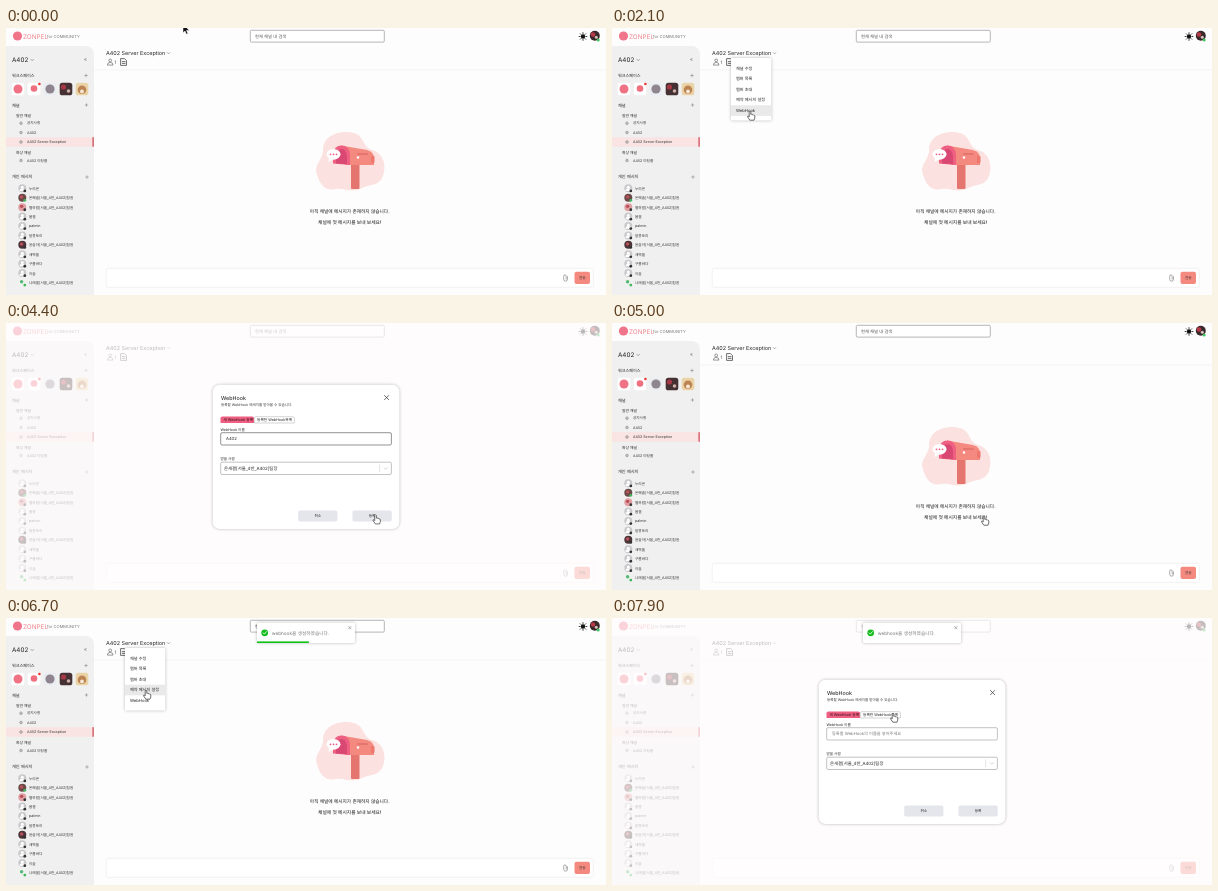
An HTML page that plays this animation: 600 px wide and 267 px high, repeating every 8 s.

```html
<!DOCTYPE html>
<html lang="ko">
<head>
<meta charset="utf-8">
<title>Webhook demo</title>
<style>
  html, body { margin: 0; width: 100%; height: 100%; overflow: hidden; background: #fefdfd; }
  svg { display: block; width: 100%; height: 100%; }
  text { font-family: Inter, "Noto Sans CJK KR", "Noto Sans CJK", sans-serif; text-rendering: geometricPrecision; white-space: pre; }
  .soft { filter: drop-shadow(0 .6px 1.8px rgba(0, 0, 0, .28)); }
</style>
</head>
<body>
<svg id="stage" viewBox="0 0 600 267"></svg>
<script>
const LOOP = 8000;
const INK = '#222', PINK = '#ee5f82', SALMON = '#f4897f';

// Text is placed by its vertical centre.
const text = (x, y, size, str, fill = INK, attrs = '') =>
  `<text x="${x}" y="${y + size * .36}" font-size="${size}" fill="${fill}" ${attrs}>${str}</text>`;
const middle = 'text-anchor="middle" font-weight="500"';
const rect = (x, y, w, h, fill, r = 0, attrs = '') =>
  `<rect x="${x}" y="${y}" width="${w}" height="${h}" rx="${r}" fill="${fill}" ${attrs}/>`;
const circle = (x, y, r, fill, attrs = '') => `<circle cx="${x}" cy="${y}" r="${r}" fill="${fill}" ${attrs}/>`;
const line = (d, stroke = INK, width = .6) =>
  `<path d="${d}" fill="none" stroke="${stroke}" stroke-width="${width}" stroke-linecap="round" stroke-linejoin="round"/>`;
const chevron = (x, y, s = 1.3, color = '#555') => line(`M${x - s} ${y - s / 2}l${s} ${s}l${s} ${-s}`, color, .5);
const cross = (x, y, s, color, w) => line(`M${x - s} ${y - s}l${2 * s} ${2 * s}m0 ${-2 * s}l${-2 * s} ${2 * s}`, color, w);
const plus = (x, y) => line(`M${x - 1.3} ${y}h2.6m-1.3 -1.3v2.6`, '#777', .5);

function darkPicture(x, y, r) {
  return circle(x, y, r, '#38292b') + circle(x - r * .35, y - r * .25, r * .45, '#b83a48') +
    circle(x + r * .3, y + r * .3, r * .3, '#d8c4bd');
}

function topBar() {
  const rays = Array.from({ length: 8 }, (_, i) => {
    const c = Math.cos(i * Math.PI / 4), s = Math.sin(i * Math.PI / 4);
    return `M${577 + 3 * c} ${8.5 + 3 * s}L${577 + 3.9 * c} ${8.5 + 3.9 * s}`;
  }).join('');
  return circle(11.5, 8, 4.6, '#f0748a') +
    text(17, 8.2, 6.4, 'ZONPEL', '#ee8790') +
    text(41, 9, 4.1, 'for COMMUNITY', '#777') +
    rect(244.3, 2.3, 134, 11.8, '#fff', 1.2, 'stroke="#999" stroke-width=".7"') +
    text(249, 8.3, 4.3, '현재 채널 내 검색', '#555') +
    circle(577, 8.5, 2.2, '#111') + line(rays, '#111', .8) +
    darkPicture(588.8, 7.8, 5) + circle(592.2, 12, 1.5, '#3fc564');
}

function workspaceIcons() {
  const tile = (x, fill) => rect(x - 6.3, 54.7, 12.6, 12.6, fill, 2.6);
  return tile(12, '#fff') + circle(12, 61, 4.5, '#ef7285') +
    tile(28, '#fff') + circle(28, 60.5, 3.3, '#ef6f7f') + circle(33.4, 56, 1.3, '#e33') +
    tile(44, '#e9edf2') + circle(44, 61, 4.6, '#8f858f') +
    tile(60, '#453033') + circle(57.5, 59, 2.6, '#a63845') + circle(62.5, 63, 1.8, '#cdb0a8') +
    tile(76, '#ead3a6') + circle(76, 61.8, 4.3, '#bd8453') + circle(76, 63.5, 2, '#f6e8d2');
}

function directMessages() {
  const team = '[서울_4반_A402]팀원';
  const people = ['누리온', '온해솔' + team, '별하람' + team, '봄결', 'palmin', '달콩토리',
    '윤슬아' + team, '새벽돌', '구름바다', '이슬', '나래울' + team];
  const pictures = { 1: '#6a4a48', 2: '#e0a0a4', 6: '#4a3438', 10: '#eef2ee' };
  return people.map((name, i) => {
    const y = 160.3 + 9.42 * i;
    const avatar = pictures[i]
      ? circle(16.3, y, 4, pictures[i]) + circle(15.6, y - .8, 1.7, i === 10 ? '#55b878' : '#b9505a')
      : circle(16.3, y, 4, '#c9c9cc') + circle(16.3, y - 1.1, 1.5, '#fff') +
        `<path d="M13.5 ${y + 2.7}a2.8 2.6 0 0 1 5.6 0z" fill="#fff"/>`;
    return avatar + circle(18.8, y + 2.6, 1.4, i === 1 || i === 10 ? '#3fb85c' : '#333') +
      text(23, y + .2, 3.65, name, '#333');
  }).join('');
}

function sidebar() {
  const channel = (y, name) =>
    circle(15, y, 1.3, 'none', 'stroke="#777" stroke-width=".6"') + circle(15, y, .5, '#777') + text(21, y, 3.6, name, '#333');
  return `<path d="M0 18H79q9 0 9 9V267H0z" fill="#f0f0f0"/>` +
    text(6, 32, 6.3, 'A402') + chevron(26.2, 32) + text(78, 31.5, 5, '«', '#666') +
    text(6, 47.5, 4.1, '워크스페이스') + plus(80, 47.5) + workspaceIcons() +
    text(6, 77, 4.2, '채널') + plus(80.5, 77) +
    text(10, 87.3, 3.8, '일반 채널') +
    rect(0, 109.2, 88, 9.5, '#fae3e3') + rect(86.3, 109.2, 1.7, 9.5, '#d9737c') +
    channel(95.2, '공지사항') + channel(104.5, 'A402') + channel(114, 'A402 Server Exception') +
    text(10, 124.7, 3.8, '화상 채널') + channel(132.5, 'A402 미팅룸') +
    text(6, 148.7, 4.2, '개인 메시지') + plus(81, 149) + directMessages();
}

function mailbox() {
  return `<path d="M311 146C307 137 318 131 317 121C318 106 336 102 348 105C359 108 356 119 366 122
      C377 125 381 137 377 148C373 158 365 156 356 160C344 166 339 159 329 161C319 164 313 155 311 146z" fill="#fbe1e0"/>` +
    rect(345, 130, 8.5, 31, '#e5766f', 1) +
    `<path d="M335 117.5L361 122q7 2 7 8v7H339z" fill="${SALMON}"/>
     <path d="M327 135.5v-9q1-9 8.5-9t8.5 9v10.5z" fill="${PINK}"/>
     <path d="M330 135.5v-8q1-6.5 5.5-6.5t5.5 7v8z" fill="#d94873"/>` +
    rect(351, 125, 11, 2, '#e5766f', 1) + circle(352, 129.5, 1.2, '#fff') +
    rect(365, 128, 3.5, 7, '#ee776e', 1) +
    `<ellipse cx="327.5" cy="126.3" rx="7" ry="5.4" fill="#fff"/><path d="M323 130l-.5 4 5-3z" fill="#fff"/>` +
    [324.5, 327.5, 330.5].map(x => circle(x, 126.3, .9, PINK)).join('');
}

function channelView() {
  return line('M88 42H600', '#efefef', .7) +
    text(100, 25, 5.45, 'A402 Server Exception') + chevron(162.5, 25.2, 1.2) +
    circle(104.2, 32.4, 1.4, 'none', 'stroke="#555" stroke-width=".6"') +
    line('M101.4 36.7q0-2.3 2.8-2.3t2.8 2.3z', '#555') + text(108.5, 34, 4.6, '1', '#555') +
    line('M115 30.6h3.5l2 2v4.8H115zM116.3 33.6h2.8M116.3 35.4h2.8', '#333', .7) +
    mailbox() +
    text(343.7, 183, 4.7, '아직 채널에 메시지가 존재하지 않습니다.', '#111', middle) +
    text(343.7, 194.3, 4.75, '채널에 첫 메시지를 보내 보세요!', '#111', middle) +
    rect(100.3, 240.3, 487, 19, '#fff', 1.5, 'stroke="#ececec" stroke-width=".7"') +
    line('M561.5 248.7v2.6a1.9 1.9 0 0 1-3.8 0v-3.2a1.2 1.2 0 0 1 2.5 0v3', '#777', .6) +
    rect(568.5, 243.8, 15.5, 12.2, SALMON, 2) + text(576.3, 250, 3.7, '전송', '#333', middle);
}

function menu() {
  const items = ['채널 수정', '멤버 목록', '멤버 초대', '예약 메시지 설정', 'WebHook'];
  return rect(119, 30, 40.3, 62.5, '#fff', 1.2, 'class="soft"') +
    rect(119, 0, 40.3, 10.6, '#e9e9e9', 0, 'id="hover"') +
    items.map((item, i) => text(124, 40.2 + 10.6 * i, 4.15, item)).join('');
}

function modal() {
  const field = (y, id) => rect(214.7, y, 170.7, 12.3, '#fff', 1.3, `id="${id}" stroke="#aaa" stroke-width=".7"`);
  const button = (x, label) => rect(x, 187.5, 39.2, 11, '#e4e6eb', 1.8) + text(x + 19.6, 193, 3.7, label, INK, middle);
  return rect(0, 0, 600, 267, '#fffdfd', 0, 'opacity=".7"') +
    rect(206.7, 61.7, 186.7, 144.3, '#fff', 7, 'class="soft"') +
    text(215, 74.8, 5.4, 'WebHook', '#111') +
    text(215, 81.5, 3.55, '등록할 WebHook 메세지를 받아볼 수 있습니다.', '#333') +
    cross(380.6, 74.6, 2.1, '#333', .7) +
    `<path d="M214.5 100v-4.7q0-1.8 1.8-1.8h30q1.8 0 1.8 1.8v4.7z" fill="${PINK}"/>
     <path d="M248.3 100v-4.7q0-1.6 1.6-1.6h36.9q1.6 0 1.6 1.6v4.7z" fill="#fff" stroke="#aaa" stroke-width=".5"/>` +
    text(217.3, 96.9, 3.75, '새 WebHook 등록', '#301018') + text(251, 96.9, 3.7, '등록한 WebHook목록') +
    text(214.5, 106.3, 3.6, 'WebHook 이름') + field(109.7, 'nameField') +
    text(220, 115.9, 4.2, '', '#777', 'id="nameText"') +
    text(214.5, 135.6, 3.6, '받을 사람') + field(139.2, 'personField') +
    text(218, 145.4, 4.4, '온새결[서울_4반_A402]팀장') +
    line('M373.6 141.8v7.2', '#ccc', .5) + chevron(379.7, 145.5, 1.5, '#aaa') +
    button(292.2, '취소') + button(346.5, '등록');
}

function toast() {
  return rect(251, 4.8, 98, 20.2, '#fff', 1.2, 'class="soft"') +
    circle(258.7, 14.8, 3.4, '#15bd1f') + line('M257.1 14.9l1.2 1.2l2.2-2.5', '#fff', .8) +
    text(265.7, 14.9, 4.7, 'webhook을 생성하였습니다.', '#757575') + cross(343.8, 9.7, 1.2, '#777', .6) +
    rect(251, 23.4, 98, 1.6, '#0cc414', 0, 'id="progress"');
}

// Every pointer shape has its hot spot at 0,0.
const pointers = `
  <path id="arrow" d="M0 0V8.8L2 7L3.4 10.2L4.9 9.5L3.5 6.4H6.2z" fill="#111" stroke="#fff" stroke-width=".5"/>
  <path id="hand" d="M-.8 .8q.8-1.6 1.6 0V3.4q1-.5 1.5.3q1-.4 1.4.5q1-.2 1.1.9V7L4 9.2H-.2L-2.4 5.9q-.2-1.2.9-.8l.7.7z"
    fill="#fff" stroke="#222" stroke-width=".65"/>
  <path id="beam" d="M-1 -3.5H1M0 -3.5V3.5M-1 3.5H1" stroke="#222" stroke-width=".6"/>`;

const group = (id, content) => `<g id="${id}">${content}</g>`;
document.getElementById('stage').innerHTML = rect(0, 0, 600, 267, '#fefdfd') + topBar() + sidebar() + channelView() +
  group('menu', menu()) + group('modal', modal()) + group('toast', toast()) + group('pointer', pointers);

const el = id => document.getElementById(id);
const show = (id, visible) => el(id).setAttribute('display', visible ? 'inline' : 'none');
const within = (t, ...spans) => spans.some(([from, to]) => t >= from && t < to);
const smooth = u => u * u * (3 - 2 * u);
const easeOut = u => 1 - (1 - u) ** 3;

// Keys are [time, ...values]; each stretch between two keys is eased.
function track(keys, t, ease) {
  const next = keys.findIndex(key => key[0] > t);
  if (next < 0) return keys[keys.length - 1].slice(1);
  if (next === 0) return keys[0].slice(1);
  const a = keys[next - 1], b = keys[next];
  const u = ease((t - a[0]) / (b[0] - a[0]));
  return a.slice(1).map((v, i) => v + (b[i + 1] - v) * u);
}

const pointerPath = [
  [250, 177, -4], [950, 150, 24], [1200, 150, 24], [1900, 138, 83], [2400, 138, 83],
  [2700, 215, 112], [2950, 215, 112], [3200, 220.5, 115.8], [3800, 220.5, 115.8],
  [4450, 372, 193], [5050, 372, 193], [5750, 177, 59], [5850, 177, 59], [6200, 150, 24],
  [6350, 150, 24], [6700, 140, 72], [7000, 138, 83], [7250, 138, 83], [7800, 281, 95]
];
const bounce = [[0, -940], [.6, 8], [.75, -3], [.9, 1.5], [1, 0]];
const TOAST_IN = 5050, TOAST_READY = 5760, TOAST_LIFE = 2000;

function draw(t) {
  const [x, y] = track(pointerPath, t, smooth);
  el('pointer').setAttribute('transform', `translate(${x} ${y})`);
  const beam = within(t, [2650, 3950]);
  const hand = within(t, [850, 2450], [4350, 5150], [6100, 7350], [7700, LOOP]);
  show('beam', beam);
  show('hand', hand);
  show('arrow', !beam && !hand);

  show('menu', within(t, [1150, 2300], [6250, 7250]));
  const row = Math.floor((y - 34.9) / 10.6);
  show('hover', row >= 0 && row < 5);
  el('hover').setAttribute('y', 34.9 + 10.6 * row);

  show('modal', within(t, [2300, 4850], [7250, LOOP]));
  const typed = t < 4850 ? 'A402'.slice(0, Math.max(0, Math.floor((t - 3400) / 100))) : '';
  el('nameText').textContent = typed || '등록할 WebHook의 이름을 넣어주세요';
  el('nameText').setAttribute('fill', typed ? INK : '#777');
  el('nameField').setAttribute('stroke', within(t, [3000, 4850]) ? '#666' : '#aaa');

  show('toast', t >= TOAST_IN);
  const entry = Math.min(1, Math.max(0, (t - TOAST_IN) / (TOAST_READY - TOAST_IN)));
  el('toast').setAttribute('transform', `translate(0 ${track(bounce, entry, easeOut)[0]})`);
  el('toast').setAttribute('opacity', Math.min(1, easeOut(Math.min(1, entry / .6))));
  const left = Math.min(1, Math.max(0, 1 - (t - TOAST_READY) / TOAST_LIFE));
  el('progress').setAttribute('width', 98 * left);
}

function frame() {
  draw(performance.now() % LOOP);
  requestAnimationFrame(frame);
}
frame();
</script>
</body>
</html>
```
